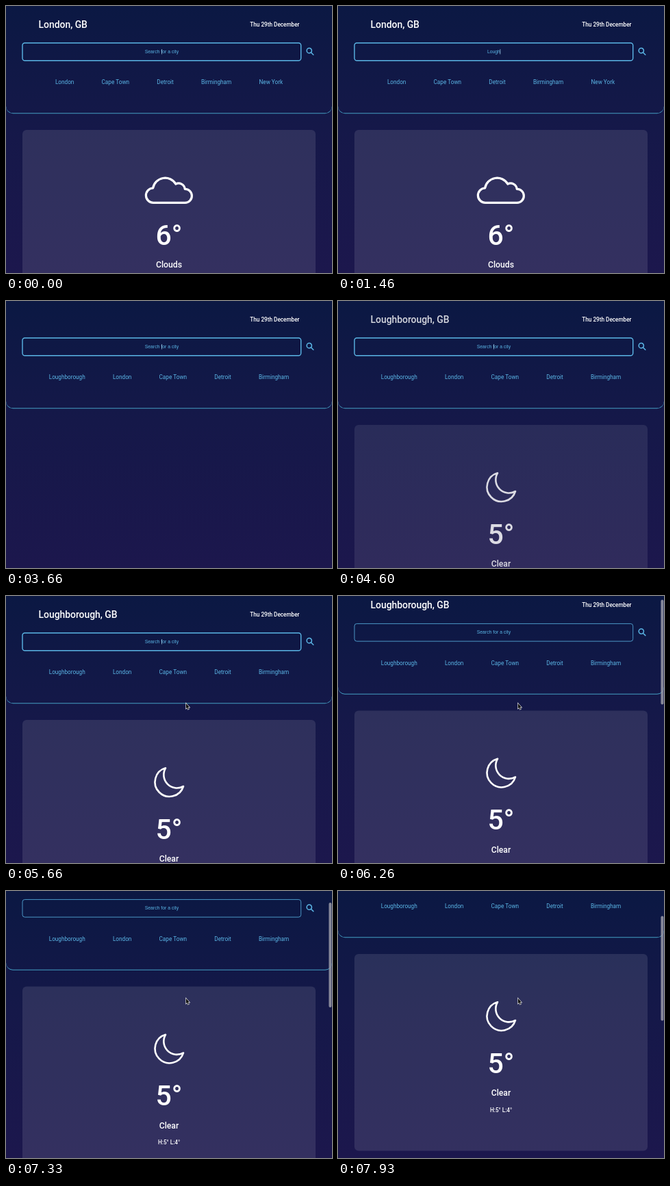
These frames come from a looping animation (476x390 px, 8 s). An HTML page with a canvas:

```html
<!DOCTYPE html>
<html lang="en">
<head>
<meta charset="utf-8">
<title>Weather search</title>
<style>
html, body { margin: 0; width: 100%; height: 100%; overflow: hidden; background: #0b1843; }
canvas { display: block; width: 476px; height: 390px; }
</style>
</head>
<body>
<canvas id="stage"></canvas>
<script>
const W = 476, H = 390, LOOP = 8000;
const canvas = document.getElementById('stage');
const ctx = canvas.getContext('2d');
const dpr = window.devicePixelRatio || 1;
canvas.width = W * dpr;
canvas.height = H * dpr;

const BLUE = '#5bb6e6', LINE = '#439fc4', WHITE = '#fff';
const ROBOTO = 'Roboto, sans-serif';
const INPUT_FONT = '6.85px "Liberation Sans", Arial, sans-serif';
const QUERY = 'Loughborough';
const KEY_TIMES = [660, 1000, 1130, 1330, 1460, 1660, 1800, 1930, 2060, 2200, 2330, 2460];
const SUBMIT = 3060, FADE_OUT = 450, LOADED = 3900, FADE_IN = 950;
const POINTER_IN = 5130, BLUR = 5800, SCROLL_START = 6040;
const SCROLL = [[SCROLL_START, 0], [6200, 9], [6400, 24], [6600, 34], [6730, 37],
  [7000, 39.5], [7330, 41.5], [7530, 52], [7730, 70], [7930, 89], [8000, 93]];

const before = {
  title: 'London, GB', temp: '6°', sky: 'Clouds', shift: 0, range: 'H:7° L:5°',
  icon: new Path2D('M215.5 287.3A10.6 10.6 0 0 1 214.6 266A18 18 0 0 1 247.8 260A9.2 9.2 0 0 1 261.2 267.3A10 10 0 0 1 261.5 287.3Z'),
  cities: ['London', 'Cape Town', 'Detroit', 'Birmingham', 'New York']
};
const after = {
  title: 'Loughborough, GB', temp: '5°', sky: 'Clear', shift: 6, range: 'H:5° L:4°',
  icon: new Path2D('M233 251.3A21.2 21.2 0 1 0 259 278A19.3 19.3 0 0 1 233 251.3Z'),
  cities: ['Loughborough', 'London', 'Cape Town', 'Detroit', 'Birmingham']
};
const searchIcon = new Path2D('M446.4 65.2A3.6 3.6 0 1 1 439.2 65.2A3.6 3.6 0 1 1 446.4 65.2M445.5 68L448.8 71.2');
const pointer = new Path2D('M262.8 156.8V164.6L264.5 163.1L265.7 165.8L267 165.2L265.8 162.6H268Z');

const clamp = x => Math.max(0, Math.min(1, x));
const ease = x => { x = clamp(x); return x * x * (3 - 2 * x); };

function track(points, t) {
  if (t <= points[0][0]) return points[0][1];
  const i = points.findIndex(p => p[0] >= t);
  const [t0, a] = points[i - 1], [t1, b] = points[i];
  return a + (b - a) * (t - t0) / (t1 - t0);
}

function text(str, x, y, font, color = WHITE, align = 'left') {
  ctx.font = font;
  ctx.fillStyle = color;
  ctx.textAlign = align;
  ctx.fillText(str, x, y);
}

function stroke(path, color, width) {
  ctx.strokeStyle = color;
  ctx.lineWidth = width;
  ctx.stroke(path);
}

function roundRect(x, y, w, h, r) {
  const path = new Path2D();
  path.roundRect(x, y, w, h, r);
  return path;
}

function background() {
  const g = ctx.createLinearGradient(0, 0, 0, H);
  g.addColorStop(0, '#0b1843');
  g.addColorStop(0.45, '#151849');
  g.addColorStop(1, '#1c174d');
  ctx.fillStyle = g;
  ctx.fillRect(0, 0, W, H);
}

// Bottom border that tapers off around the rounded corners.
function headerEdge() {
  ctx.beginPath();
  ctx.moveTo(0, 147);
  ctx.ellipse(10, 147, 10, 10.2, 0, Math.PI, Math.PI / 2, true);
  ctx.ellipse(W - 10, 147, 10, 10.2, 0, Math.PI / 2, 0, true);
  ctx.ellipse(W - 10, 147, 9.7, 9.2, 0, 0, Math.PI / 2);
  ctx.ellipse(10, 147, 9.7, 9.2, 0, Math.PI / 2, Math.PI);
  ctx.fillStyle = LINE;
  ctx.fill();
}

function cityLinks(cities) {
  const gap = 40.2;
  ctx.font = '8.2px ' + ROBOTO;
  const widths = cities.map(c => ctx.measureText(c).width);
  let x = (W - widths.reduce((a, b) => a + b, gap * (cities.length - 1))) / 2;
  cities.forEach((city, i) => {
    text(city, x, 114.4, '8.2px ' + ROBOTO, BLUE);
    x += widths[i] + gap;
  });
}

function caretOn(t) {
  if (t >= BLUR) return false;
  if (t < KEY_TIMES[0]) return t < 460;
  if (t < SUBMIT) return t < 2960;
  return (t - 3590 + 1000) % 1000 < 500;
}

function searchBox(t) {
  const focused = t < BLUR;
  stroke(roundRect(24, 54, 406.7, 25.7, 3.5), BLUE, focused ? 1.4 : 0.8);
  const typed = t < SUBMIT ? QUERY.slice(0, KEY_TIMES.filter(k => k <= t).length) : '';
  text(typed || 'Search for a city', 227.4, 69, INPUT_FONT, BLUE, 'center');
  if (caretOn(t)) {
    const x = 227.2 + (typed ? ctx.measureText(typed).width / 2 : 0);
    ctx.fillStyle = '#a9d6ee';
    ctx.fillRect(x - 0.2, 63, 0.7, 7.5);
  }
  ctx.lineCap = 'round';
  stroke(searchIcon, BLUE, 1.5);
}

function weather(w, alpha) {
  ctx.globalAlpha = alpha;
  text(w.title, 47.5, 32, '500 13.9px ' + ROBOTO);
  ctx.fillStyle = 'rgba(255,255,255,0.105)';
  ctx.fill(roundRect(24, 181, 428, 287.5, 6));
  ctx.lineJoin = 'round';
  stroke(w.icon, WHITE, w === before ? 3.2 : 2.6);
  text(w.temp, 238, 348.7 + w.shift, '500 41px ' + ROBOTO, WHITE, 'center');
  text(w.sky, 238, 382.2 + w.shift, '500 12.2px ' + ROBOTO, WHITE, 'center');
  text(w.range, 238, 405.8 + w.shift, '500 8.2px ' + ROBOTO, WHITE, 'center');
  ctx.globalAlpha = 1;
}

function draw(t) {
  const scroll = track(SCROLL, t);
  ctx.setTransform(dpr, 0, 0, dpr, 0, 0);
  background();

  ctx.save();
  ctx.translate(0, -scroll);
  headerEdge();
  text('Thu 29th December', 428.5, 29.8, '500 8.2px ' + ROBOTO, WHITE, 'right');
  searchBox(t);
  cityLinks((t < SUBMIT + 70 ? before : after).cities);
  if (t < LOADED) weather(before, 1 - ease((t - SUBMIT) / FADE_OUT));
  else weather(after, ease((t - LOADED) / FADE_IN));
  ctx.restore();

  if (t >= SCROLL_START) {
    ctx.fillStyle = 'rgba(165,165,175,0.8)';
    ctx.fill(roundRect(471.4, scroll * 0.41, 4, 153, 2));
  }
  if (t >= POINTER_IN) {
    ctx.lineJoin = 'miter';
    stroke(pointer, WHITE, 1.1);
    ctx.fillStyle = '#111';
    ctx.fill(pointer);
  }
}

const start = performance.now();
function tick() {
  draw((performance.now() - start) % LOOP);
  requestAnimationFrame(tick);
}
tick();
</script>
</body>
</html>
```
